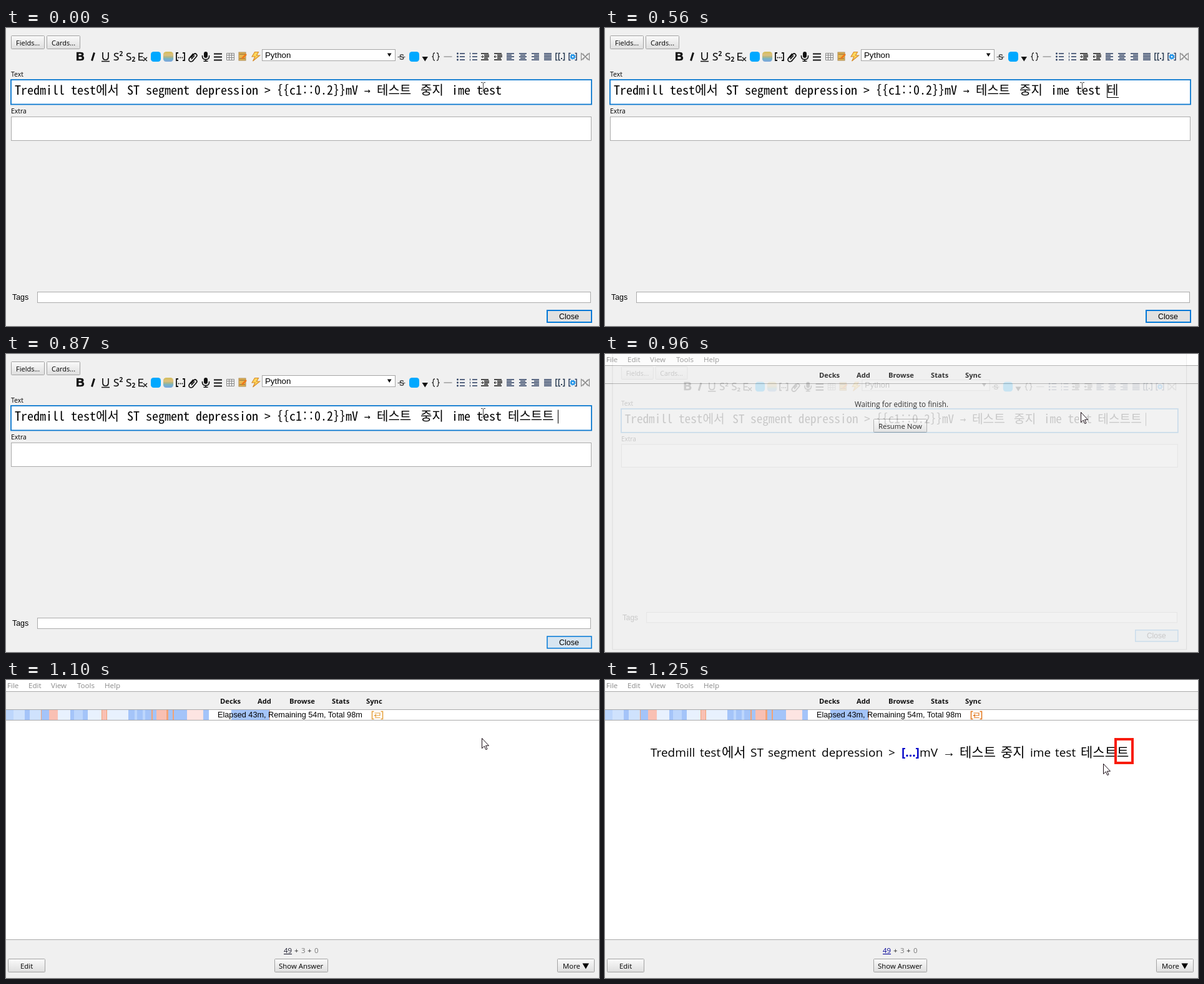
Recreate the animation shown at these times as an HTML page. Size 950 px wide and 478 px high, loop 3.25 s.

```html
<!DOCTYPE html>
<html lang="ko">
<head>
<meta charset="utf-8">
<title>Card editor</title>
<style>
  html, body { margin: 0; width: 100%; height: 100%; overflow: hidden; background: #f0f0f0; }
  svg { display: block; width: 950px; height: 478px; }
  text { white-space: pre; }
  .ui { font-family: "Open Sans", "Noto Sans", sans-serif; }
  .arial { font-family: "Liberation Sans", Arial, sans-serif; }
  .mono { font-family: "Noto Sans Mono CJK KR", "Noto Sans Mono CJK JP", "Noto Sans Mono", monospace; font-size: 20px; }
  .arrow { font-family: "DejaVu Sans Mono", monospace; font-size: 16.6px; }
  .card { font-family: "Open Sans", "Noto Sans", sans-serif; font-size: 19px; }
  .hangul { font-family: "Noto Sans CJK KR", "Noto Sans CJK JP", sans-serif; font-size: 21px; }
  .b { font-weight: bold; }
</style>
</head>
<body>
<svg id="stage" viewBox="0 0 950 478" xmlns="http://www.w3.org/2000/svg">
  <defs>
    <linearGradient id="button" x2="0" y2="1">
      <stop offset="0" stop-color="#fafafa"/><stop offset="1" stop-color="#dedede"/>
    </linearGradient>
    <linearGradient id="swatch" x2="0" y2="1">
      <stop offset="0" stop-color="#d3bd58"/><stop offset=".35" stop-color="#dcc080"/>
      <stop offset=".5" stop-color="#b5b780"/><stop offset=".7" stop-color="#79b4c4"/>
      <stop offset="1" stop-color="#79a5e0"/>
    </linearGradient>
  </defs>
  <g id="main"></g>
  <g id="dialog"></g>
  <g id="pointers"></g>
</svg>
<script>
const LOOP = 3250;
const $ = id => document.getElementById(id);
const show = (id, on) => $(id).setAttribute('display', on ? 'inline' : 'none');

const rect = (x, y, w, h, fill, extra = '') =>
  `<rect x="${x}" y="${y}" width="${w}" height="${h}" fill="${fill}" ${extra}/>`;
const path = (d, stroke, width = 1, fill = 'none', extra = '') =>
  `<path d="${d}" stroke="${stroke}" stroke-width="${width}" fill="${fill}" ${extra}/>`;
const text = (s, x, y, size, cls = 'ui', fill = '#000', extra = '') =>
  `<text x="${x}" y="${y}" class="${cls}" ${size ? `font-size="${size}"` : ''} fill="${fill}" ${extra}>${
    s.replace(/&/g, '&amp;').replace(/</g, '&lt;').replace(/>/g, '&gt;')}</text>`;
const box = (x, y, w, h, stroke, fill = '#fff', extra = '') =>
  rect(x + .5, y + .5, w - 1, h - 1, fill, `stroke="${stroke}" ${extra}`);
const button = (label, x, y, w, h, tx, size = 11.4) =>
  box(x, y, w, h, '#a2a2a2', 'url(#button)', 'rx="1"') + text(label, tx, y + h / 2 + 4.5, size);

// Editor text sits on a 10px grid; a Hangul syllable takes two cells.
const isHangul = c => /[\u3131-\uD7A3]/.test(c);
function gridText(s, col = 0) {
  let out = '';
  for (const run of s.match(/[\u3131-\uD7A3]+|→|[^\u3131-\uD7A3→ ]+| +/g) || []) {
    if (run[0] !== ' ') out += run === '→'
      ? text(run, 14 + col * 10, 106, 0, 'arrow')
      : text(run, 14 + col * 10, 107, 0, 'mono');
    col += run.length * (isHangul(run[0]) ? 2 : 1);
  }
  return out;
}

function bars(x, rows, color, width = 13, gap = 2.5, y = 41) {
  const d = rows.map(([start, len], i) => `M${x + start} ${y + i * gap}h${len}`).join('');
  return path(d, color, 1.3);
}

function toolbar() {
  const ink = '#111', navy = '#26395c', blue = '#00a8ff';
  const swatch = (x, fill) => rect(x, 38, 16, 16, fill, 'rx="4.5"');
  const full = [0, 12], list = [5, 8];
  let s = text('B', 112, 52, 19, 'arial b', ink, 'stroke="#111" stroke-width=".7"')
    + path('M141.5 39.5L137.5 52.5', ink, 3)
    + path('M155 39v7q0 5 4.5 5t4.5-5v-7M153 53.5h13', ink, 1.7)
    + text('S', 172, 52, 17, 'ui', ink, 'stroke="#111" stroke-width=".3"') + text('2', 181.5, 45, 10, 'ui b', ink)
    + text('S', 192, 52, 17, 'ui', ink, 'stroke="#111" stroke-width=".3"') + text('2', 201.5, 54, 10, 'ui b', ink)
    + path('M220 40.5h-7v11h7M213 46h6', ink, 1.7) + path('M220 47l6 6M226 47l-6 6', ink, 1.3)
    + swatch(232, blue) + swatch(252, 'url(#swatch)')
    + path('M276 40h-3v12h3M283 40h3v12h-3', ink, 1.8)
    + [276.5, 279.5, 282.5].map(x => `<circle cx="${x}" cy="47.5" r="1" fill="${ink}"/>`).join('')
    + path('M296 48l5-6q2-2 4 0t0 4l-6 7q-3 2-5 0t0-5l6-7M297 50l5-6', ink, 1.7)
    + rect(317, 38, 6, 10, ink, 'rx="3"')
    + path('M314.5 44v1.5q0 5 5.5 5t5.5-5v-1.5M320 50v3M316.5 53.3h7', ink, 1.6)
    + path('M333 41.5h13M333 46.5h13M333 51.5h13', ink, 2)
    + path('M353.5 40.5h12v11h-12zM353.5 43.5h12M353.5 47.5h12M357.5 40.5v11M361.5 40.5v11', '#888')
    + rect(373, 39, 11, 13, '#e9b64e', 'stroke="#a98a55"')
    + path('M374 42h9M374 49h9', '#7c6542', 1.2) + path('M378 49l7-7', '#f07818', 2.5)
    + path('M398.5 38.5h6l-3 5.5h5l-11 9 3.5-7h-5z', '#d68928', 1.1, '#ffd75c');

  s += box(410, 34, 214, 19, '#a5a5a5') + text('Python', 415, 48, 13.3, 'arial')
    + path('M610.8 40.5h6.8l-3.4 5.5z', 'none', 0, ink)
    + text('S', 630, 51, 12, 'arial b', '#444') + path('M627.5 46.5h12', '#444')
    + swatch(646, blue) + path('M666.5 46h9.5l-4.7 7.5z', 'none', 0, ink)
    + path('M687 40q-2.5 0-2.5 2.5v1.5q0 2-2 2 2 0 2 2v1.5q0 2.5 2.5 2.5M690 40q2.5 0 2.5 2.5v1.5q0 2 2 2-2 0-2 2v1.5q0 2.5-2.5 2.5', '#333', 1.3)
    + path('M701.5 46h13', '#888', 1.2);

  s += bars(722, [list, list, list], navy, 13, 5) + bars(742, [list, list, list], navy, 13, 5);
  for (const y of [41, 46, 51])
    s += `<circle cx="723.5" cy="${y}" r="1.4" fill="${navy}"/>` + path(`M743.5 ${y - 1.5}v3`, navy);
  s += bars(761, [full, [5, 8], [5, 8], [5, 6], full], ink) + path('M761 46h4M763 44l2 2-2 2', ink)
    + bars(782, [full, [5, 8], [5, 8], [5, 6], full], ink) + path('M786 46h-4M784 44l-2 2 2 2', ink);
  const ragged = [0, 4, 0, 4, 0];
  [0, .5, 1].forEach((anchor, i) => {
    const x = [802, 822, 842][i];
    s += bars(x, ragged.map(cut => [cut * anchor, 12 - cut]), navy);
  });
  s += bars(862, ragged.map(() => full), navy);

  s += path('M883.5 40.5h-2.5v11h2.5M888 40.5h-2.5v11h2.5M892 40.5h2.5v11h-2.5', '#26384f', 1.5)
    + rect(889, 48, 2, 2, '#26384f')
    + path('M904.5 40.5h-2.5v11h2.5M911.5 40.5h2.5v11h-2.5', navy, 1.4)
    + '<circle cx="908" cy="46" r="2.6" fill="none" stroke="#148ee8" stroke-width="2"/>'
    + '<circle cx="908" cy="46" r="4" fill="none" stroke="#148ee8" stroke-width="1.3" stroke-dasharray="1.5 1.64"/>'
    + path('M921.5 40.5v11l6.5-5.5zM934.5 40.5v11l-6.5-5.5z', '#888', 1.1)
    + path('M924 40.5l8 11M932 40.5l-8 11', '#888', .9);
  return s;
}

function buildDialog() {
  const line = 'Tredmill test에서 ST segment depression > {{c1::0.2}}mV → 테스트 중지 ime test';
  $('dialog').innerHTML = rect(-6.6, -12, 959, 497.5, '#f0f0f0', 'stroke="#777"')
    + button('Fields...', 8, 12, 54, 22, 16, 11) + button('Cards...', 65, 12, 54, 22, 73, 11)
    + toolbar()
    + text('Text', 8, 78, 10.5) + text('Extra', 8, 137, 10.5)
    + rect(8, 83, 930, 39.5, '#fff', 'stroke="#0a78cf" stroke-width="1.8"')
    + box(8, 142, 930, 39, '#ababab')
    + gridText(line) + '<g id="typed"></g>'
    + text('Tags', 10, 436, 12.4, 'arial') + box(50, 423, 887, 18, '#ababab')
    + rect(867, 453, 71, 19, '#e1e1e1', 'id="close" stroke="#0078d7" stroke-width="2"')
    + text('Close', 886, 467, 12.5, 'arial');
}

// Each entry: right edge and colour key.
const TINTS = { a: '#a4c4f9', b: '#bdd6fc', c: '#cfe2fd', d: '#e8f1fe', o: '#f2a376', p: '#f9c0b3', q: '#fde4e2', w: '#fff' };
const HISTORY = '12b 30c 38a 56c 57o 69a 83p 103d 109a 123b 131a 153d 162p 196d 206a 210b 219a 223b 233a 235o 241a 257p 260o 267a 269o 290a 316q 325a 361w 422a 423o 950w';

function progress() {
  let x = 0, s = '';
  for (const part of HISTORY.split(' ')) {
    const end = parseInt(part);
    s += rect(x, 48, end - x, 16, TINTS[part.slice(-1)]);
    x = end;
  }
  return s + path('M153.5 48v16M161.5 48v16', '#f0a477');
}

function cardText() {
  const latin = [['Tredmill', 73], ['test', 152], ['ST', 233], ['segment', 261], ['depression', 347],
    ['>', 454], ['mV', 504], ['ime', 681], ['test', 721]];
  const hangul = [['에서', 187], ['테스트', 568], ['중지', 634], ['테스트트', 762]];
  return latin.map(([s, x]) => text(s, x, 123, 0, 'card')).join('')
    + hangul.map(([s, x]) => text(s, x, 123, 0, 'hangul')).join('')
    + text('→', 541, 123, 20, 'arial') + text('[...]', 475, 123, 0, 'card b', '#0000c8');
}

function buildMain() {
  const menu = [['File', 2], ['Edit', 36], ['View', 72], ['Tools', 114], ['Help', 158]];
  const tabs = [['Decks', 343], ['Add', 403], ['Browse', 454], ['Stats', 522], ['Sync', 577]];
  $('main').innerHTML = rect(0, 0, 950, 478, '#f0f0f0') + rect(0, 0, 950, 18, '#fff')
    + menu.map(([s, x]) => text(s, x, 13, 11.6, 'ui', '#8a8a8a')).join('')
    + path('M0 18.5h950M0 47.5h950', '#aaa')
    + tabs.map(([s, x]) => text(s, x, 38, 11.2, 'ui b', '#111')).join('')
    + '<g id="waiting">' + text('Waiting for editing to finish.', 400, 85, 11.7, 'ui', '#111')
    + button('Resume Now', 430, 104, 86, 22, 438) + '</g>'
    + '<g id="review">' + rect(0, 48, 950, 368, '#fff') + progress()
    + path('M0 64.5h950M0 416.5h950', '#aaa')
    + text('Elapsed 43m, Remaining 54m, Total 98m', 339, 60, 12.7, 'arial')
    + '<g id="mark">' + path('M589.5 50.5h-3v12h3M600.5 50.5h3v12h-3', 'currentColor', 1.5)
    + path('M590.5 53h8.5v4h-8M593 55l-2.5 2 2.5 2M599.5 60.5h-8.5', 'currentColor', 1.2) + '</g>'
    + '<g id="card">' + cardText() + '</g>'
    + rect(818, 95, 27, 38, 'none', 'id="highlight" stroke="#f81b08" stroke-width="4"')
    + text('49', 445, 438, 11.4, 'ui', '#223', 'id="due" text-decoration="underline"')
    + text('+', 462, 438, 11.4, 'ui', '#222') + text('3', 473, 438, 11.4, 'ui', '#777')
    + text('+', 483, 438, 11.4, 'ui', '#222') + text('0', 494, 438, 11.4, 'ui', '#777')
    + button('Edit', 3, 447, 60, 22, 23) + button('Show Answer', 430, 447, 86, 22, 437)
    + button('More', 883, 447, 60, 22, 892) + path('M923.5 454.5h10.5l-5.2 9z', 'none', 0, '#000')
    + '</g>';
}

function buildPointers() {
  $('pointers').innerHTML = path('M761 87.5h2.5l1 1 1-1h2.5M764.5 88v13M761 101.5h2.5l1-1 1 1h2.5', '#444', 1, 'none', 'id="beam"')
    + path('M.5 .5v16.2l3.8-3.6 2.5 5.6 2.2-1-2.5-5.4h5z', '#1a0d16', 1, '#fff', 'id="arrow"');
}

const TYPING = [[0, ''], [160, 'ㅌ'], [240, '테'], [410, '텟'], [560, '테'], [640, '테스'], [720, '테스트'], [870, '테스트트']];
const START = 79;

function typed(t) {
  const word = TYPING.filter(([at]) => at <= t).pop()[1];
  if (!word) return '';
  const composing = t < 870;
  const x = 14 + 10 * START + 20 * (word.length - (composing ? 1 : 0));
  return gridText(word, START) + path(`M${x + .5} 89.5v22`, '#000')
    + (composing ? path(`M${x} 111.5h19`, '#000') : '');
}

let lastTyped = null;
function draw(t) {
  const closing = t >= 960, reviewing = t >= 1100, settled = t >= 1250;
  const content = typed(t);
  if (content !== lastTyped) $('typed').innerHTML = lastTyped = content;

  show('dialog', t < 1020);
  $('dialog').setAttribute('transform', closing ? 'translate(18.3 8.4) scale(.959)' : '');
  $('dialog').setAttribute('opacity', closing ? .16 : 1);
  $('close').setAttribute('fill', t >= 870 ? '#d7e5f1' : '#e1e1e1');
  $('close').setAttribute('stroke-width', t >= 870 ? 1.5 : 2);

  show('waiting', !reviewing);
  show('review', reviewing);
  show('card', t >= 1180);
  $('card').setAttribute('opacity', settled ? 1 : .6);
  show('highlight', settled);
  $('mark').setAttribute('color', settled ? '#e2761b' : '#e5a03c');
  $('due').setAttribute('fill', settled ? '#0a0a9a' : '#223');

  show('beam', !closing);
  show('arrow', closing);
  $('arrow').setAttribute('transform', settled ? 'translate(798 134)' : 'translate(762 93)');
}

buildMain();
buildDialog();
buildPointers();
const begin = performance.now();
function tick() {
  draw((performance.now() - begin) % LOOP);
  requestAnimationFrame(tick);
}
draw(0);
requestAnimationFrame(tick);
</script>
</body>
</html>
```
